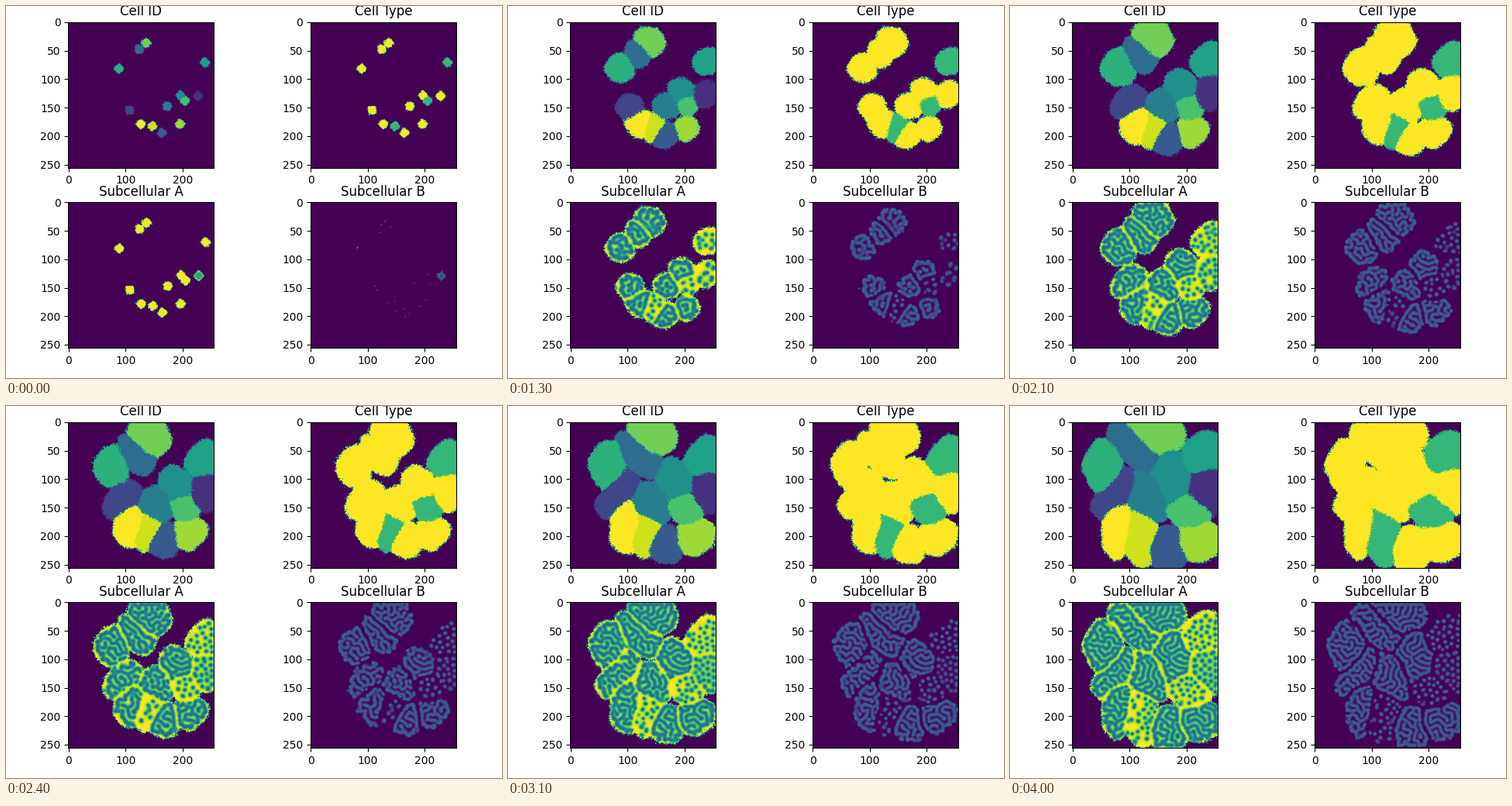
Recreate the animation shown at these times as a matplotlib script. Size 640 by 480 pixels, loop 4.1 s.

```python
import numpy as np
import matplotlib.pyplot as plt
from matplotlib.animation import FuncAnimation

W, H, DPI = 640, 480, 100
N = 256                 # lattice side
FRAMES, INTERVAL = 41, 100
STEPS = 90              # reaction steps per frame
DU, DV = 0.10, 0.05
FIRST_ID = 2
SPOTTED = [8, 10, 13]   # ids of the second cell type
SPARSE = 2              # id of the cell with few, large spots

# Cells in id order. Each later pose is x, y and the two half axes.
TIMES = [0.0, 1.7, 3.1, 4.0]
START = [(228, 129), (108, 154), (164, 194), (124.5, 46.5), (174, 147),
         (197, 128), (240, 70), (89, 81), (205, 137), (137, 36),
         (196, 178), (148, 182), (127.5, 178.5)]
GROWN = [(241, 126, 30, 30), (107, 150, 32, 32), (168, 201, 29, 29),
         (118, 55, 31, 31), (168, 148, 30, 30), (193, 118, 30, 30),
         (241, 69, 30, 30), (88, 80, 32, 32), (207, 145, 25, 25),
         (138, 33, 35, 35), (206, 187, 27, 27), (144, 184, 25, 34),
         (119, 174, 34, 34)]
PACKED = [(242, 119, 36, 45), (85, 126, 50, 30), (167, 215, 33, 36),
          (122, 57, 54, 30), (142, 141, 44, 36), (182, 104, 36, 42),
          (242, 65, 42, 42), (67, 74, 34, 45), (204, 149, 36, 33),
          (144, 22, 45, 45), (219, 201, 38, 33), (130, 193, 30, 44),
          (98, 180, 31, 54)]
CROWDED = [(239, 117, 43, 49), (76, 125, 54, 32), (167, 223, 38, 43),
           (108, 43, 58, 32), (133, 129, 52, 38), (174, 102, 38, 57),
           (238, 57, 50, 42), (55, 77, 36, 52), (206, 153, 44, 36),
           (147, 17, 54, 45), (221, 209, 45, 37), (119, 202, 33, 53),
           (78, 183, 28, 60)]
TILT = np.radians([0, -50, 0, 40, 55, 0, 0, 0, 0, 0, 0, 0, 0])
POSES = np.array([[(x, y, 9, 9) for x, y in START], GROWN, PACKED, CROWDED],
                 dtype=float)


def by_id(usual, spotted, sparse):
    """Lookup table from cell id to a reaction constant; 0 in the medium."""
    table = np.zeros(FIRST_ID + len(START), np.float32)
    table[FIRST_ID:] = usual
    table[SPOTTED] = spotted
    table[SPARSE] = sparse
    return table


FEED = by_id(0.040, 0.035, 0.025)
KILL = by_id(0.060, 0.0645, 0.060)
SEED = by_id(0.006, 0.0015, 0.0005)
TYPE = by_id(3, 2, 3)

rng = np.random.default_rng(7)
Y, X = np.mgrid[:N, :N].astype(float)


def pose(t):
    i = min(np.searchsorted(TIMES, t, side="right"), len(TIMES) - 1)
    w = (t - TIMES[i - 1]) / (TIMES[i] - TIMES[i - 1])
    return POSES[i - 1] * (1 - w) + POSES[i] * w


def jitter():
    n = rng.normal(size=(N, N))
    return n + 0.6 * (np.roll(n, 1, 0) + np.roll(n, 1, 1))


def label(t):
    """Cell id of every pixel, and how deep it lies in its cell."""
    rough = 0.5 + 0.5 * min(1, t)
    wave = min(1, t / 1.5)
    x = X + rough * jitter() + wave * (2 * np.sin(Y / 11 + 1) + np.sin((X + Y) / 7))
    y = Y + rough * jitter() + wave * (2 * np.sin(X / 12) + np.sin((X - Y) / 8))
    power = min(2, 1.4 + 2 * t)
    depth = []
    for (cx, cy, a, b), turn in zip(pose(t), TILT):
        dx, dy = x - cx, y - cy
        c, s = np.cos(turn), np.sin(turn)
        depth.append(np.abs((c * dx + s * dy) / a) ** power
                     + np.abs((c * dy - s * dx) / b) ** power)
    depth = np.array(depth)
    q = depth.min(axis=0)
    return np.where(q < 1, depth.argmin(axis=0) + FIRST_ID, 0), q


def react(u, v, ids):
    """Gray-Scott inside each cell; v is lost at cell borders, u is not."""
    down = (ids[1:] == ids[:-1]).astype(np.float32)
    side = (ids[:, 1:] == ids[:, :-1]).astype(np.float32)
    feed = FEED[ids]
    loss = feed + KILL[ids]
    for _ in range(STEPS):
        lap_u = np.zeros_like(u)
        flow = (u[1:] - u[:-1]) * down
        lap_u[:-1] += flow
        lap_u[1:] -= flow
        flow = (u[:, 1:] - u[:, :-1]) * side
        lap_u[:, :-1] += flow
        lap_u[:, 1:] -= flow

        lap_v = -4 * v
        lap_v[:-1] += v[1:] * down
        lap_v[1:] += v[:-1] * down
        lap_v[:, :-1] += v[:, 1:] * side
        lap_v[:, 1:] += v[:, :-1] * side

        uvv = u * v * v
        u += DU * lap_u - uvv + feed * (1 - u)
        v += DV * lap_v + uvv - loss * v


def sow(u, v, ids):
    """Drop small patches of v where nothing has reacted yet."""
    spots = (u > 0.85) & (rng.random((N, N)) < SEED[ids])
    for axis in (0, 1):
        spots = spots | np.roll(spots, 1, axis) | np.roll(spots, -1, axis)
    v[spots & (ids > 0)] = 0.6


def simulate():
    ids, q = label(0)
    u = (ids > 0).astype(np.float32)
    v = np.zeros_like(u)
    v[(ids > 0) & (q > 0.8) & (rng.random((N, N)) < 0.03)] = 1
    core = (ids == SPARSE) & (q < 0.75)
    u[core] = 0.45 + 0.3 * rng.random(core.sum())
    v[core] = 0.3
    v[core & (q < 0.08)] = 0.1
    states = [(ids, u.copy(), v.copy())]
    for n in range(1, FRAMES):
        old, (ids, _) = ids, label(n * INTERVAL / 1000)
        u[(old == 0) & (ids > 0)] = 1
        u[ids == 0] = 0
        v[ids == 0] = 0
        sow(u, v, ids)
        react(u, v, ids)
        states.append((ids, u.copy(), v.copy()))
    return states


fig = plt.figure(figsize=(W / DPI, H / DPI), dpi=DPI, facecolor="white")


def panel(left, top, title, vmax):
    size = 188.0
    ax = fig.add_axes([left / W, 1 - (top + size) / H, size / W, size / H])
    image = ax.imshow(np.zeros((N, N)), cmap="viridis", vmin=0, vmax=vmax)
    ax.set_title(title, fontsize=12)
    ax.set_xticks([0, 100, 200])
    ax.set_yticks(range(0, 251, 50))
    return image


images = [panel(80.4, 20.6, "Cell ID", FIRST_ID + len(START) - 1),
          panel(392.9, 20.6, "Cell Type", 3),
          panel(80.4, 253.0, "Subcellular A", 1),
          panel(392.9, 253.0, "Subcellular B", 1)]
states = simulate()


def draw(n):
    ids, u, v = states[n]
    for image, data in zip(images, (ids, TYPE[ids], u, v)):
        image.set_data(data)
    return images


anim = FuncAnimation(fig, draw, frames=FRAMES, interval=INTERVAL,
                     repeat=True, repeat_delay=0)
plt.show()
```
